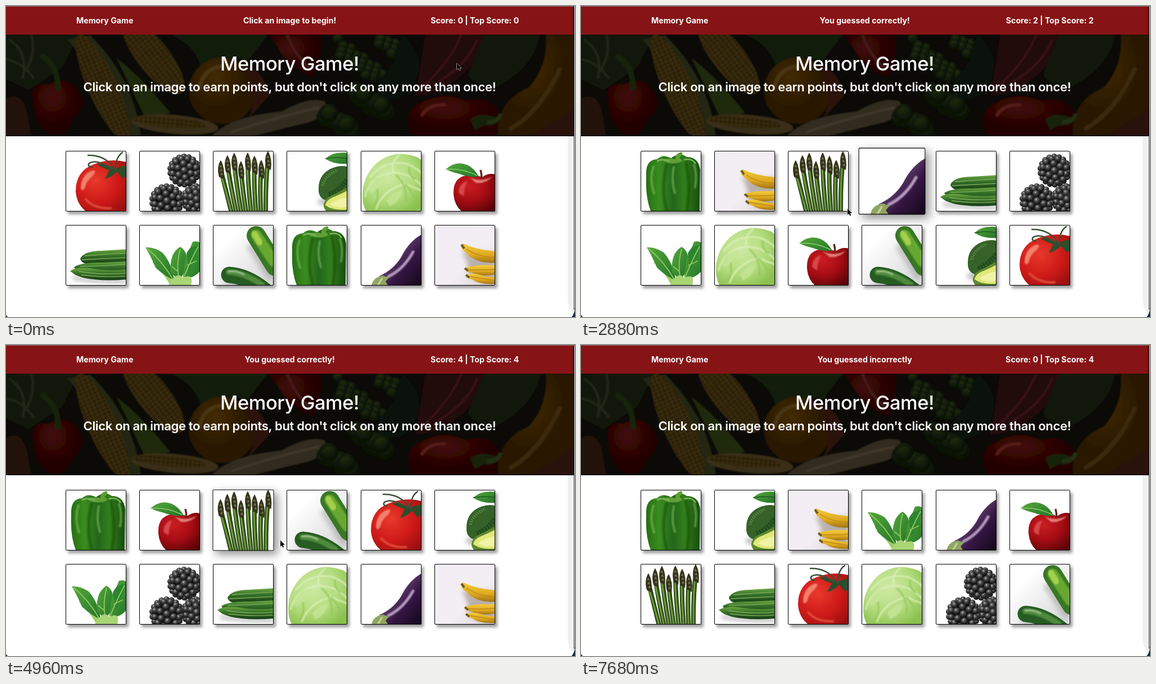
Write an HTML page that moves like this. It is 1012 px wide and 554 px high and loops after 7.84 s.

```html
<!DOCTYPE html>
<html lang="en">
<head>
<meta charset="utf-8">
<title>Memory Game</title>
<style>
html, body { margin: 0; width: 100%; height: 100%; overflow: hidden; background: #fff; }
#stage { position: relative; width: 1012px; height: 554px; overflow: hidden; background: #fff; font-family: Inter, "Open Sans", sans-serif; }
#stage > svg { position: absolute; left: 0; top: 0; }
text { fill: #fff; }
.nav { font-size: 14.2px; font-weight: 700; }
.mid { text-anchor: middle; }
.title { font-size: 34.5px; font-weight: 500; letter-spacing: -.5px; }
.sub { font-size: 22.1px; font-weight: 600; letter-spacing: -.37px; }
.card { position: absolute; width: 108px; height: 108px; border-radius: 2px; background: #fff; box-shadow: 4px 5px 5px rgba(0,0,0,.38); }
.card svg { display: block; border-radius: 2px; }
.card::after { content: ""; position: absolute; inset: 0; border: 1.5px solid #000; border-radius: 2px; }
.card.over { transform: scale(1.1); z-index: 1; box-shadow: 6px 6px 16px rgba(0,0,0,.45); }
.card.fresh { transform: scale(1.01); }
#pointer { z-index: 2; overflow: visible; }
</style>
</head>
<body>
<div id="stage">
<svg width="1012" height="554" viewBox="0 0 1012 554">
  <defs>
    <pattern id="kernels" width="8" height="7" patternUnits="userSpaceOnUse">
      <rect width="8" height="7" fill="#2c2107"/><rect x=".6" y=".6" width="6.8" height="5.8" rx="2.5" fill="#45350c"/>
    </pattern>
    <radialGradient id="darkRed" cx=".4" cy=".3"><stop stop-color="#520b09"/><stop offset="1" stop-color="#2b0303"/></radialGradient>
    <radialGradient id="darkGold" cx=".4" cy=".3"><stop stop-color="#503407"/><stop offset="1" stop-color="#301c03"/></radialGradient>
    <radialGradient id="darkGreen" cx=".45" cy=".35"><stop stop-color="#23300f"/><stop offset="1" stop-color="#0d1606"/></radialGradient>
    <filter id="soft"><feGaussianBlur stdDeviation="1"/></filter>
    <clipPath id="heroBox"><path d="M0 51H1011V232H0z"/></clipPath>
  </defs>
  <g clip-path="url(#heroBox)">
    <path d="M0 51H1012V232H0z" fill="#0d0c08"/>
    <g filter="url(#soft)">
      <path d="M0 51H130L100 110 40 150 0 130z" fill="#171d0c"/>
      <path d="M5 60Q40 80 30 130M45 51Q55 90 30 120M0 95Q30 100 50 130" fill="none" stroke="#2b2f1d" stroke-width="4"/>
      <path d="M0 165Q28 150 38 190L45 232H0z" fill="#2c1407"/>
      <path d="M48 165Q42 135 75 140 108 122 128 150 148 178 120 200 105 240 75 226 48 212 48 165z" fill="url(#darkRed)"/>
      <path d="M92 146Q94 110 66 90" fill="none" stroke="#1d2b10" stroke-width="10" stroke-linecap="round"/>
      <path d="M108 60Q135 80 155 160L210 232H240Q228 130 150 52z" fill="#292d13"/>
      <g transform="rotate(-24 172 145)"><ellipse cx="172" cy="145" rx="26" ry="103" fill="url(#kernels)"/></g>
      <g transform="rotate(-38 262 90)"><ellipse cx="262" cy="90" rx="29" ry="82" fill="url(#kernels)"/></g>
      <path d="M196 92Q240 125 292 190L250 205Q224 150 196 92z" fill="#25300f"/>
      <path d="M292 51Q340 70 348 116 374 80 430 98L466 51z" fill="#16200b"/>
      <ellipse cx="385" cy="151" rx="60" ry="59" fill="url(#darkGold)"/>
      <path d="M344 147Q350 112 382 108" fill="none" stroke="#594014" stroke-width="7" stroke-linecap="round"/>
      <path d="M415 104Q460 110 468 160L430 202Q455 150 415 104z" fill="#36140a"/>
      <g transform="rotate(5 300 211)"><ellipse cx="300" cy="211" rx="78" ry="17" fill="#45391a"/><ellipse cx="290" cy="208" rx="66" ry="9" fill="url(#kernels)"/></g>
      <path d="M365 232Q400 196 490 188 540 160 567 170 580 192 540 207 470 224 440 232z" fill="#3c3527"/>
      <path d="M400 225Q490 195 558 181" fill="none" stroke="#4b4332" stroke-width="5"/>
      <path d="M468 51H560Q564 90 547 128 510 116 490 85z" fill="url(#darkRed)"/>
      <path d="M500 51Q515 90 540 110" fill="none" stroke="#50201d" stroke-width="5"/>
      <g id="sprouts"></g>
      <path d="M705 51Q755 95 720 150 680 185 655 145L690 100z" fill="#10190a"/>
      <path d="M745 51H850Q846 95 810 125 765 160 728 160 738 100 745 51z" fill="#2c070b"/>
      <path d="M810 51Q790 100 740 145M838 60Q820 105 768 135" fill="none" stroke="#45161a" stroke-width="4"/>
      <path d="M850 51H950Q940 110 870 145 825 140 822 120z" fill="#171b0b"/>
      <path d="M722 232Q702 185 742 170 778 150 818 169 868 155 880 200L870 232z" fill="url(#darkRed)"/>
      <path d="M740 194Q752 175 780 176" fill="none" stroke="#66201a" stroke-width="6" stroke-linecap="round"/>
      <path d="M875 232Q870 170 930 145 965 105 960 51H1012V180Q970 225 920 232z" fill="url(#darkGold)"/>
      <path d="M895 220Q950 190 986 110" fill="none" stroke="#49310a" stroke-width="8"/>
      <path d="M930 232Q970 210 1012 180V232z" fill="#321411"/>
      <path d="M826 202Q845 186 878 202 870 216 850 212L834 221z" fill="#1c2c10"/>
      <path d="M856 207Q877 206 880 192" fill="none" stroke="#293b17" stroke-width="7"/>
    </g>
    <path d="M0 51H1011V232H0z" fill="#000" opacity=".18"/>
    <path d="M0 231.5H1011" stroke="#000"/>
  </g>
  <path d="M0 0H1011V51H0z" fill="#861416"/>
  <path d="M1007 0H1011V51H1007z" fill="#6a0e11"/>
  <path d="M0 .5H1011" stroke="#8f7476"/>
  <path d="M999 232H1010V548Q1000 540 999 525z" fill="#f0f0f0"/>
  <path d="M1010.5 0V541" stroke="#111"/>
  <path d="M1012 537V554H1006Q1011 549 1012 537z" fill="#14293d"/>
  <path d="M0 550Q1 553 4 554H0z" fill="#222"/>
  <text class="nav" x="125" y="31">Memory Game</text>
  <text class="nav mid" id="message" x="504.7" y="31"></text>
  <text class="nav mid" id="score" x="833.7" y="31"></text>
  <text class="title mid" x="504.5" y="115">Memory Game!</text>
  <text class="sub mid" x="504.5" y="151.5">Click on an image to earn points, but don't click on any more than once!</text>
</svg>

<svg width="0" height="0">
  <defs>
    <radialGradient id="red" cx=".35" cy=".35" r=".7"><stop stop-color="#e8392b"/><stop offset=".55" stop-color="#cf1a18"/><stop offset="1" stop-color="#960f10"/></radialGradient>
    <radialGradient id="crimson" cx=".35" cy=".3" r=".75"><stop stop-color="#c91c22"/><stop offset=".5" stop-color="#a80d14"/><stop offset="1" stop-color="#5b0308"/></radialGradient>
    <radialGradient id="bead" cx=".4" cy=".32" r=".65"><stop stop-color="#d8d8d8"/><stop offset=".2" stop-color="#6a6a6a"/><stop offset=".55" stop-color="#383838"/><stop offset="1" stop-color="#121214"/></radialGradient>
    <radialGradient id="lime" cx=".4" cy=".35" r=".7"><stop stop-color="#cfeaa4"/><stop offset=".6" stop-color="#b2db7d"/><stop offset="1" stop-color="#8ac04e"/></radialGradient>
    <linearGradient id="green" x2="0" y2="1"><stop stop-color="#6fa843"/><stop offset=".4" stop-color="#38752a"/><stop offset="1" stop-color="#153c14"/></linearGradient>
    <linearGradient id="bell"><stop stop-color="#256f12"/><stop offset=".25" stop-color="#3b8c20"/><stop offset=".5" stop-color="#22661a"/><stop offset=".7" stop-color="#327e1c"/><stop offset="1" stop-color="#174d0e"/></linearGradient>
    <linearGradient id="leaf" x2="1" y2="1"><stop stop-color="#55a83c"/><stop offset="1" stop-color="#237427"/></linearGradient>
    <linearGradient id="purple" x2="1" y2="1"><stop offset=".2" stop-color="#2b1238"/><stop offset=".45" stop-color="#52305f"/><stop offset=".6" stop-color="#351643"/><stop offset=".9" stop-color="#190820"/></linearGradient>
    <linearGradient id="yellow" x2="0" y2="1"><stop stop-color="#f3cb3c"/><stop offset=".6" stop-color="#dfa81f"/><stop offset="1" stop-color="#a07416"/></linearGradient>
    <linearGradient id="grey" x2="1" y2="1"><stop offset=".25" stop-color="#fff"/><stop offset="1" stop-color="#d4d4d6"/></linearGradient>
    <linearGradient id="mauve" x2="1" y2="1"><stop stop-color="#f1edf4"/><stop offset=".6" stop-color="#f2eef2"/><stop offset="1" stop-color="#d8d2d6"/></linearGradient>
    <filter id="haze" x="-50%" y="-50%" width="200%" height="200%"><feGaussianBlur stdDeviation="4"/></filter>
    <filter id="sheen" x="-50%" y="-50%" width="200%" height="200%"><feGaussianBlur stdDeviation="1.2"/></filter>

    <symbol id="T" viewBox="0 0 108 108">
      <path d="M18 72Q18 36 50 24 85 10 120 24V118H55Q20 105 18 72z" fill="url(#red)"/>
      <path d="M27 66Q28 42 48 35 57 34 48 45 37 53 34 67 29 74 27 66z" fill="#f2806c" filter="url(#sheen)"/>
      <path d="M35 85Q50 104 82 102" fill="none" stroke="#e04a37" stroke-width="4" filter="url(#sheen)"/>
      <path d="M88 32Q72 22 55 24 70 33 78 34L70 50Q84 46 91 37L101 49 108 44V26Q98 27 88 32z" fill="#2d4d2b"/>
      <path d="M86 31Q70 7 40 8M83 32Q55 14 42 22 38 28 47 29M89 34Q88 12 101 3" fill="none" stroke="#3c4e38" stroke-width="2.5" stroke-linecap="round"/>
    </symbol>
    <symbol id="B" viewBox="0 0 108 108"><g id="berries"></g></symbol>
    <symbol id="S" viewBox="0 0 108 108"><g id="spears"></g></symbol>
    <symbol id="V" viewBox="0 0 108 108">
      <ellipse cx="73" cy="91" rx="18" ry="7" fill="#777" opacity=".5" filter="url(#haze)"/>
      <path d="M69 14Q84 0 110 4V23Q84 25 69 14z" fill="url(#leaf)"/>
      <path d="M69 14Q90 10 110 14" fill="none" stroke="#1d5a22" stroke-width="1.5"/>
      <path d="M57 67Q57 40 83 30 100 24 112 30V88H70Q56 84 57 67z" fill="#356229"/>
      <path d="M64 62Q68 43 91 34" fill="none" stroke="#5c8644" stroke-width="5" stroke-dasharray="2 2"/>
      <path d="M75 78Q93 72 108 51" fill="none" stroke="#214c1d" stroke-width="9" stroke-dasharray="4 1.5"/>
      <path d="M66 98Q66 84 86 77 98 70 112 64V112H76Q67 106 66 98z" fill="#5d872c"/>
      <path d="M69 97Q70 87 87 81 99 76 112 69V104Q84 108 69 97z" fill="#dfe878"/>
      <path d="M77 95Q91 84 112 83V98Q92 105 77 95z" fill="#f0f2a6"/>
    </symbol>
    <symbol id="C" viewBox="0 0 108 108">
      <path d="M3 82Q2 47 28 22 60 -5 102 12L112 20V112H12Q3 98 3 82z" fill="url(#lime)"/>
      <g filter="url(#sheen)" opacity=".75">
        <path d="M16 47Q42 15 81 23 107 33 112 48M7 82Q17 43 57 39 87 38 109 63M27 104Q39 69 79 59L109 71M58 40Q52 19 70 7" fill="none" stroke="#dff2bd" stroke-width="3"/>
        <path d="M62 43Q83 60 80 90M79 59Q96 76 101 102M28 66Q34 83 24 99M87 27Q83 43 97 51" fill="none" stroke="#91c557" stroke-width="3"/>
        <path d="M13 69Q22 45 46 43 36 65 18 76zM46 88Q59 72 74 70 70 91 51 99z" fill="#c6e69a"/>
      </g>
    </symbol>
    <symbol id="A" viewBox="0 0 108 108">
      <path d="M34 78Q32 43 65 43 80 44 85 47 98 37 114 44V112H54Q36 101 34 78z" fill="url(#crimson)"/>
      <path d="M62 47Q82 57 103 46 91 59 74 57z" fill="#e08078" filter="url(#sheen)"/>
      <path d="M43 75Q44 57 59 54 53 65 52 81z" fill="#d84648" filter="url(#sheen)"/>
      <path d="M84 50Q84 41 82 34" fill="none" stroke="#64281a" stroke-width="3.5"/>
      <path d="M20 33Q38 17 58 25 70 30 79 46 62 48 44 41 31 38 20 33z" fill="url(#leaf)"/>
      <path d="M21 33Q47 30 76 44" fill="none" stroke="#8dc86e" stroke-width="1.5"/>
    </symbol>
    <symbol id="K" viewBox="0 0 108 108">
      <path d="M13 94Q60 102 108 101" stroke="#777" stroke-width="7" fill="none" opacity=".5" filter="url(#haze)"/>
      <path d="M26 60Q33 46 64 46L110 43V69L45 70Q28 70 26 60z" fill="url(#green)"/>
      <path d="M15 75Q28 66 66 67L110 65V85L45 87Q20 86 15 75z" fill="url(#green)"/>
      <path d="M8 82Q18 75 42 77 77 83 110 79V97Q62 101 31 94L17 89z" fill="url(#green)"/>
      <path d="M34 55Q70 52 109 50M29 62Q70 60 109 58M26 74Q70 73 109 70M24 83Q66 90 109 86M28 89Q66 94 109 91" fill="none" stroke="#83ae5b" stroke-width="1.3"/>
    </symbol>
    <symbol id="L" viewBox="0 0 108 108">
      <path d="M60 108Q44 79 26 64M72 108Q69 78 67 54M84 108Q87 75 101 42" fill="none" stroke="#9dce66" stroke-width="8"/>
      <path d="M11 40Q26 39 41 49 58 68 62 98 47 93 29 76 19 53 11 40z" fill="url(#leaf)"/>
      <path d="M56 85Q53 50 73 39 89 49 83 74 78 94 69 97z" fill="url(#leaf)"/>
      <path d="M78 94Q79 58 91 40L95 30Q105 27 112 35V78Q97 98 78 94z" fill="url(#leaf)"/>
      <path d="M84 51Q91 35 108 37L89 82z" fill="#2c852e"/>
      <path d="M14 42Q42 65 61 99M73 43Q65 70 71 98M105 38Q88 70 78 96M58 74L69 83M85 72L102 64" fill="none" stroke="#8fc861" stroke-width="1.8"/>
      <path d="M54 103Q68 82 77 94 98 85 92 108H52z" fill="#a9d574"/>
    </symbol>
    <symbol id="Z" viewBox="0 0 108 108">
      <path d="M0 0H108V108H0z" fill="url(#grey)"/>
      <path d="M66 35L104 94M22 98L71 110" stroke="#777" stroke-width="15" opacity=".35" filter="url(#haze)"/>
      <path d="M77 19L111 74" stroke="#397725" stroke-width="34" stroke-linecap="round"/>
      <path d="M77 18L108 65" stroke="#66a833" stroke-width="19" stroke-linecap="round" filter="url(#sheen)"/>
      <path d="M74 16L83 31" stroke="#a5d04c" stroke-width="11" stroke-linecap="round" filter="url(#sheen)"/>
      <path d="M29 89Q60 91 91 116" fill="none" stroke="#265c22" stroke-width="29" stroke-linecap="round"/>
      <path d="M28 84Q57 85 88 107" fill="none" stroke="#4f8a3c" stroke-width="10" stroke-linecap="round" filter="url(#sheen)"/>
      <path d="M28 83Q42 81 55 88" fill="none" stroke="#a2c491" stroke-width="3" stroke-linecap="round" filter="url(#sheen)"/>
    </symbol>
    <symbol id="P" viewBox="0 0 108 108">
      <path d="M10 45Q8 16 29 15 39 5 54 13 70 1 82 11 103 11 106 34L105 112H20Q8 86 10 45z" fill="url(#bell)"/>
      <g filter="url(#sheen)">
        <path d="M47 23Q35 67 47 108M80 19Q91 60 82 108" fill="none" stroke="#154b0c" stroke-width="5" opacity=".5"/>
        <path d="M23 28Q15 49 24 76M59 29Q54 53 61 75M95 25Q101 42 97 65" fill="none" stroke="#86c565" stroke-width="4" stroke-linecap="round" opacity=".55"/>
      </g>
      <path d="M39 18Q59 27 75 18L69 12Q78 5 72 2 61 5 62 15 48 11 39 18z" fill="#5f9f35"/>
      <path d="M29 18Q42 13 52 19M77 16Q91 12 98 23" fill="none" stroke="#7db55c" stroke-width="2.5"/>
    </symbol>
    <symbol id="E" viewBox="0 0 108 108">
      <path d="M33 91Q58 80 72 57 87 27 112 15V112H38z" fill="url(#purple)"/>
      <path d="M49 92Q76 79 93 48" fill="none" stroke="#b39bbd" stroke-width="5" stroke-linecap="round" filter="url(#sheen)"/>
      <path d="M19 108Q22 93 39 90L50 94 44 101 49 108z" fill="#91a563"/>
      <path d="M30 108L38 95" stroke="#c8d296" stroke-width="3"/>
    </symbol>
    <symbol id="N" viewBox="0 0 108 108">
      <path d="M0 0H108V108H0z" fill="url(#mauve)"/>
      <path d="M49 47Q62 70 60 87 77 105 108 105V50z" fill="#8d8077" opacity=".55" filter="url(#haze)"/>
      <path d="M47 36L51 33Q75 45 110 47V67Q75 70 57 50 48 44 47 36z" fill="url(#yellow)"/>
      <path d="M54 77Q70 70 110 72V88Q82 93 67 85 57 84 54 77z" fill="url(#yellow)"/>
      <path d="M56 89Q71 84 87 91L110 94V105Q81 107 67 97 57 95 56 89z" fill="url(#yellow)"/>
      <path d="M57 43Q77 57 109 58M62 80Q83 81 109 79M64 92L107 99" fill="none" stroke="#b98916" stroke-width="1.5"/>
      <path d="M48 35L53 42M54 77L60 82M56 89L62 94" stroke="#705c22" stroke-width="4"/>
    </symbol>
  </defs>
</svg>

<svg id="pointer" width="20" height="20">
  <g id="ring"><circle cx="1.5" cy="5" r="12.5" fill="#fff" fill-opacity=".25" stroke="#fff" stroke-width="3"/><circle cx="1.5" cy="5" r="12" fill="none" stroke="#222" stroke-width="1.2"/></g>
  <path d="M0 0V11.2L2.6 8.8 4.3 12.8 6.2 12 4.5 8.1H8z" fill="#000" stroke="#fff" stroke-width="1" paint-order="stroke"/>
</svg>
</div>
<script>
const LOOP = 7840, STEP = 160, SIZE = 108;
const $ = id => document.getElementById(id);

// [start, card order, message, score, top score]
const rounds = [
  [0, 'TBSVCAKLZPEN', 'Click an image to begin!', 0, 0],
  [1760, 'NALCVPEZSKBT', 'You guessed correctly!', 1, 1],
  [2560, 'PNSEKBLCAZVT', 'You guessed correctly!', 2, 2],
  [3360, 'SNBEALPKVTZC', 'You guessed correctly!', 3, 3],
  [4320, 'PASZTVLBKCEN', 'You guessed correctly!', 4, 4],
  [5920, 'PVNLEASKTCBZ', 'You guessed incorrectly', 0, 4]
];
// the button is down for one step before each new round
const presses = rounds.slice(1).map(([start]) => start - STEP);
// [time, x, y]
const path = [
  [0, 802, 102], [160, 803, 105], [320, 803, 105], [1280, 815, 300], [1600, 815, 308],
  [1760, 750, 308], [1920, 675, 307], [2240, 556, 306], [2560, 556, 306], [2880, 474, 361],
  [3040, 424, 302], [3520, 424, 302], [4000, 320, 308], [4640, 320, 308], [5600, 824, 428],
  [6400, 824, 428], [6560, 835, 235], [6720, 842, 8], [6880, 842, 8], [7040, 844, 1], [7200, 844, -40]
];
const slots = Array.from({ length: 12 }, (_, i) => ({ x: 105.5 + i % 6 * 131.3, y: i < 6 ? 258 : 389.5 }));

// rings of drupelets, outermost first
function berry(cx, cy, r) {
  let out = `<circle cx="${cx}" cy="${cy}" r="${r - 3}" fill="#111"/>`;
  for (let ring = 3; ring >= 0; ring--) {
    const count = ring * 6 || 1;
    for (let i = 0; i < count; i++) {
      const a = i / count * 2 * Math.PI + ring * .4, d = (r - 5) * Math.sin(ring * .52);
      out += `<circle cx="${cx + d * Math.cos(a)}" cy="${cy + d * Math.sin(a)}" r="${6.8 - ring * .5}" fill="url(#bead)"/>`;
    }
  }
  return out;
}

function spear(i) {
  const x = 14 + i * 12, y = 17 + 9 * Math.sin(i * 2.3 + 1);
  const foot = 34 + i * 8.6, bend = `Q${(x + foot) / 2 - 3} 62 ${foot} 114`;
  let out = `<path d="M${x} ${y + 9}${bend}" fill="none" stroke="#2c4a18" stroke-width="8"/>
    <path d="M${x - 1} ${y + 15}${bend}" fill="none" stroke="#6c9a38" stroke-width="3"/>
    <path d="M${x} ${y - 8}Q${x + 8} ${y + 6} ${x + 5} ${y + 26}L${x - 3} ${y + 22}Q${x - 8} ${y + 4} ${x} ${y - 8}z" fill="#34341d"/>`;
  for (let k = 0; k < 3; k++)
    out += `<path d="M${x - 3 + k} ${y + 4 + k * 7}l3 -4 2 5z" fill="#6f7742"/>`;
  return out;
}

const sprout = (x, y, r) => `<circle cx="${x}" cy="${y}" r="${r}" fill="url(#darkGreen)"/>
  <path d="M${x - r * .6} ${y}Q${x} ${y - r} ${x + r * .5} ${y - r * .2}" fill="none" stroke="#34401d"/>`;

$('berries').innerHTML = berry(102, 86, 28) + berry(80, 35, 30) + berry(49, 89, 31);
$('spears').innerHTML = Array.from({ length: 8 }, (_, i) => spear(i)).join('');
$('sprouts').innerHTML = Array.from({ length: 44 }, (_, i) => i < 28
  ? sprout(590 + (i * 23) % 105, 58 + (i * 17) % 72, 10)
  : sprout(566 + (i * 31) % 112, 151 + (i * 19) % 72, 17)).join('');

const cards = slots.map(({ x, y }) => {
  const card = document.createElement('div');
  card.style.left = x + 'px';
  card.style.top = y + 'px';
  card.innerHTML = `<svg width="${SIZE}" height="${SIZE}"><use width="${SIZE}" height="${SIZE}"/></svg>`;
  $('stage').insertBefore(card, $('pointer'));
  return card;
});

let shown;
function deal(round) {
  if (round === shown) return;
  shown = round;
  const [, order, message, score, top] = round;
  cards.forEach((card, i) => card.querySelector('use').setAttribute('href', '#' + order[i]));
  $('message').textContent = message;
  $('score').textContent = `Score: ${score} | Top Score: ${top}`;
}

function pointerAt(t) {
  if (t < 0) return path[0].slice(1);
  const next = path.findIndex(p => p[0] > t);
  if (next < 0) return path[path.length - 1].slice(1);
  const [t0, x0, y0] = path[next - 1], [t1, x1, y1] = path[next];
  const k = (t - t0) / (t1 - t0);
  return [x0 + (x1 - x0) * k, y0 + (y1 - y0) * k];
}

function slotAt(t) {
  const [x, y] = pointerAt(t);
  return slots.findIndex(s => x >= s.x && x < s.x + SIZE && y >= s.y && y < s.y + SIZE);
}

function draw() {
  const t = Math.floor(performance.now() % LOOP / STEP) * STEP;
  deal(rounds.filter(r => r[0] <= t).pop());
  // the page reacts one step after the pointer, then the card grows
  const over = slotAt(t - STEP), fresh = over !== slotAt(t - 2 * STEP);
  cards.forEach((card, i) => {
    card.className = 'card' + (i === over ? fresh ? ' over fresh' : ' over' : '');
  });
  const [x, y] = pointerAt(t);
  $('pointer').style.transform = `translate(${x}px, ${y}px)`;
  $('ring').style.display = presses.includes(t) ? '' : 'none';
  requestAnimationFrame(draw);
}
draw();
</script>
</body>
</html>
```
